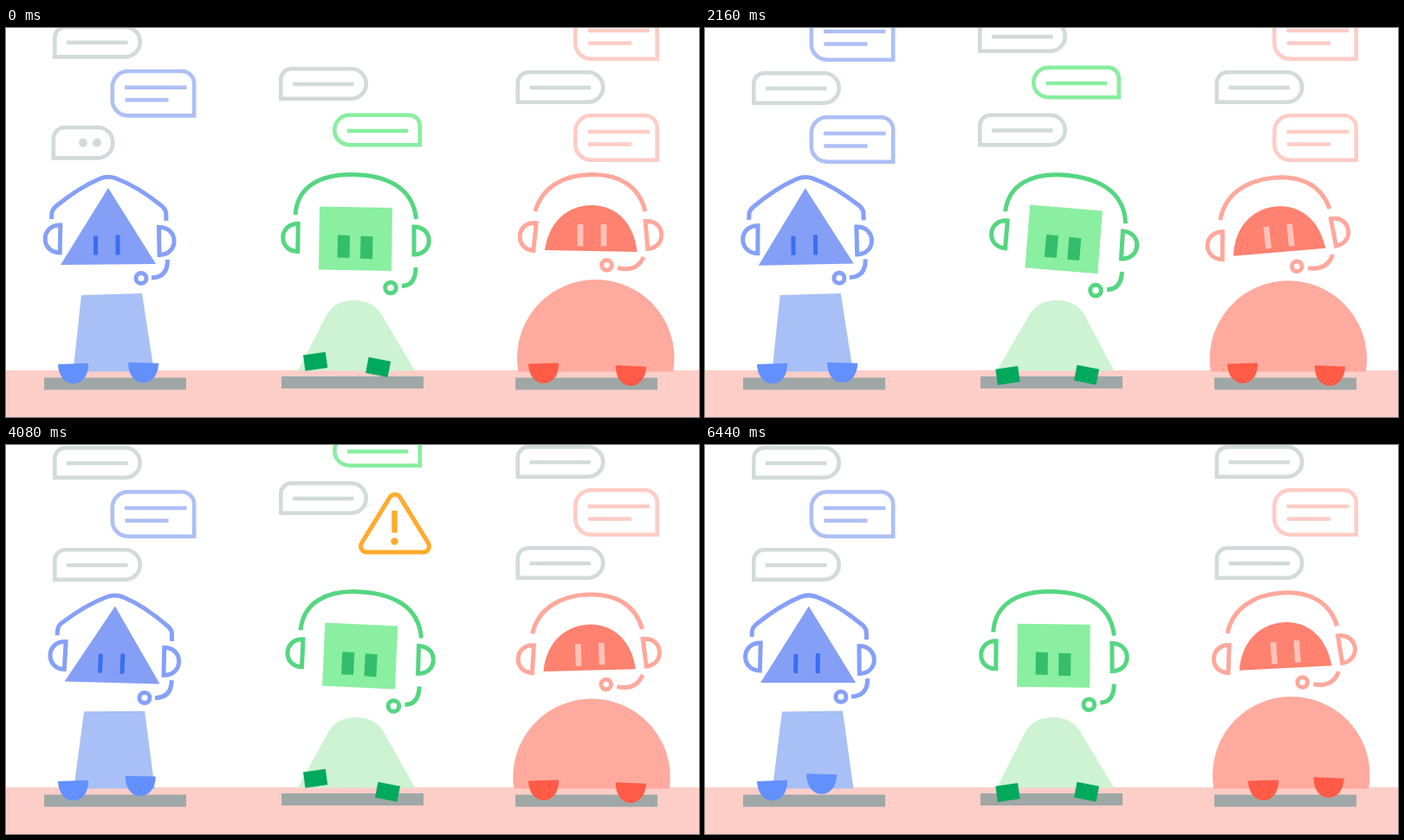
These frames come from a looping animation (800 by 450 pixels, 6.52 s). An HTML page with a canvas:

```html
<!DOCTYPE html>
<html lang="en">
<head>
<meta charset="utf-8">
<title>Support desk</title>
<style>
html, body { margin: 0; width: 100%; height: 100%; overflow: hidden; background: #fff; }
canvas { display: block; width: 800px; height: 450px; }
</style>
</head>
<body>
<canvas id="stage" width="800" height="450"></canvas>
<script>
const LOOP = 6520, STEP = 40;
const CYCLE = 2640, POP = 400, LAG = 20, TYPING = 640;
const GRAY = '#d1dbda', MINT = '#88ee9f', AMBER = '#ffab2e';
const ctx = document.getElementById('stage').getContext('2d');

// ---- timing ----
const clamp = p => Math.min(1, Math.max(0, p));
const smooth = p => p * p * (3 - 2 * p);
function back(p, s = 1.70158) {
  const q = clamp(p) - 1;
  return 1 + (s + 1) * q ** 3 + s * q * q;
}
const pop = (t, start, s) => back((t - start) / POP, s);

// Eased values between key poses [time, value, ...].
function pose(keys, t) {
  const next = keys.findIndex(k => k[0] > t);
  if (next < 0) return keys[keys.length - 1].slice(1);
  const a = keys[next - 1], b = keys[next];
  const p = smooth((t - a[0]) / (b[0] - a[0]));
  return a.slice(1).map((v, i) => v + (b[i + 1] - v) * p);
}

// ---- drawing ----
function fill(path, color) {
  ctx.fillStyle = color;
  ctx.fill(new Path2D(path));
}
function stroke(path, color, width = 5) {
  ctx.strokeStyle = color;
  ctx.lineWidth = width;
  ctx.stroke(new Path2D(path));
}
function ring(x, y, r, color, width = 5) {
  ctx.beginPath();
  ctx.arc(x, y, r, 0, 7);
  ctx.strokeStyle = color;
  ctx.lineWidth = width;
  ctx.stroke();
}
function disc(x, y, r, color) {
  ctx.beginPath();
  ctx.arc(x, y, r, 0, 7);
  ctx.fillStyle = color;
  ctx.fill();
}
function placed(x, y, deg, scale, draw) {
  ctx.save();
  ctx.translate(x, y);
  ctx.rotate(deg * Math.PI / 180);
  ctx.scale(scale, scale);
  draw();
  ctx.restore();
}
function around(x, y, dx, dy, deg, draw) {
  placed(x + dx, y + dy, deg, 1, () => {
    ctx.translate(-x, -y);
    draw();
  });
}
function ear(x, y, side, tilt, color) {
  placed(x, y, tilt, 1, () =>
    stroke(`M0 -16 V16 C${23 * side} 16 ${23 * side} -16 0 -16 Z`, color));
}

// ---- chat ----
function box(w, h, radii, color) {
  ctx.beginPath();
  ctx.roundRect(2.3, 2.3, w - 4.6, h - 4.6, radii);
  ctx.strokeStyle = color;
  ctx.lineWidth = 4.6;
  ctx.stroke();
}
const DOTS = ['1', '12', '2', '0', '01'];
function query(x, y, age = Infinity) {
  if (age < 0) return;
  placed(x, y, 0, 1, () => {
    if (age < TYPING) {
      ctx.translate(-1.5, -2);
      box(73, 40, [13, 17, 17, 0], GRAY);
      for (const i of DOTS[Math.floor(age / 150) % DOTS.length]) disc(20.5 + 16 * i, 20, 5, GRAY);
      return;
    }
    const w = 73 + 30 * back((age - TYPING) / 200);
    box(w, 39, [12, 17, 17, 0], GRAY);
    stroke(`M16 20 H${w - 16.5}`, GRAY, 4.6);
  });
}
function reply(right, y, age, color) {
  if (age < 0) return;
  placed(right, y + 56, 0, pop(age, 0), () => {
    ctx.translate(-99, -56);
    box(99, 56, [18, 14, 0, 18], color);
    stroke('M16.5 21 H88 M17 35.5 H67', color, 4.6);
  });
}

// A query and its reply arrive once per cycle and push the column up.
function column({ left, right, color, base, pitch, gap, ask, answer }, t) {
  const asked = k => ask + (k - 1) * CYCLE, answered = k => answer + (k - 1) * CYCLE;
  let scroll = gap + 18 - base;
  for (let k = 1; k < 4; k++) {
    scroll += (pitch - gap - 18) * pop(t, asked(k)) + (gap + 18) * pop(t, answered(k) + LAG);
  }
  for (let k = -1; k < 4; k++) {
    const y = k * pitch - scroll;
    query(left, y, t - asked(k));
    reply(right, y + gap, t - answered(k), color);
  }
}
const chats = [
  { left: 54, right: 219.5, color: '#aebff6', base: 119, pitch: 118, gap: 51, ask: -200, answer: 1472 },
  { left: 588.5, right: 754, color: '#ffccc5', base: 117, pitch: 117, gap: 50, ask: 28, answer: 1641 }
];

function warning() {
  ctx.beginPath();
  ctx.moveTo(0, 29.5);
  ctx.arcTo(45, 29.5, 0, -43.5, 7);
  ctx.arcTo(0, -43.5, -45, 29.5, 7);
  ctx.arcTo(-45, 29.5, 0, 29.5, 7);
  ctx.closePath();
  ctx.strokeStyle = AMBER;
  ctx.lineWidth = 5;
  ctx.stroke();
  stroke('M-.5 -18.5 V7', AMBER, 6.5);
  disc(-.5, 17, 4.2, AMBER);
}
function solved() {
  ring(0, 0, 66.5, MINT, 5.5);
  ring(-2, 0, 12.5, MINT, 5.5);
  stroke('M-26.5 49 C-26.5 17 23 17 23 49 M-15.5 -40.5 L-5 -29.5 L19.5 -54', MINT, 5.5);
}
function greenChat(t) {
  const followUp = 1456, alarm = 2520, fixed = 4408, gone = 5840;
  const scroll = 55 * pop(t, followUp + LAG) + 56.5 * pop(t, alarm) + 170 * pop(t, fixed - 100);
  query(315, 45 - scroll);
  placed(377, 98.5 - scroll, 0, 1, () => {
    box(103, 39, [17, 12, 0, 17], MINT);
    stroke('M17 20.5 H87', MINT, 4.6);
  });
  placed(315, 192.5 - scroll, 0, pop(t, followUp), () => query(0, -39));
  placed(449, 206 - scroll, 0, pop(t, alarm), warning);
  const size = t < gone ? pop(t, fixed, 1.95) : back((gone + 200 - t) / 200);
  placed(395.5, 81, 0, Math.max(0, size), solved);
}

// ---- agents ----
// Blue: lean, dip. Green: lean. Red: body shift, head shift, turn.
const blueKeys = [
  [0, 0, 0], [240, 0, 0], [960, 1, 2], [1640, .4, -1.5], [2060, -.15, 0], [2720, .9, 2],
  [3520, 1.02, 4], [4400, 0, .5], [4880, 0, .5], [5360, 1.15, .5], [6440, .07, 1.5]
];
const greenKeys = [[0, 0], [1000, .45], [1640, .26], [2720, 1], [3520, .46], [4640, .13], [5360, .27], [6440, -.06]];
const redKeys = [
  [0, 0, 0, 0], [1640, -10, -16.5, -8.5], [2720, -4.5, -7, -3], [3520, -4, -5, -2.4],
  [4640, -5.5, 2, -2.5], [5360, -5.5, 0, -2.5], [5840, -2, 0, -3], [6440, -4, -5, -4]
];

function blueAgent(t) {
  const [lean, dip] = pose(blueKeys, t), s = 5 * lean + dip, c = '#86a0f9';
  fill(`M${87 + s} ${309 - s / 4} L${157 + s} ${307 + s / 4} L${171 + s / 4} 397.5 L${77.5 + s / 4} 397.5 Z`, '#a8c0f5');
  around(118, 273.5, 15 * lean, dip, 7 * lean, () => {
    fill('M118 185 L173 273 L63 274 Z', '#859ff6');
    fill('M101 240.5 H106 V262.5 H101 Z M126.5 239.5 H131.5 V262.5 H126.5 Z', '#3a6df0');
    stroke('M52.5 221 L52.8 215 Q53 210 58 206 C75 192 95 180 108 174.5 Q117.5 170.5 127 174 C146 181 164 193 180 206 Q184.5 210 184.7 214 L185 223', c);
    ear(62.5, 244, -1, 1, c);
    ear(176.8, 246.5, 1, -1, c);
    ring(156, 289.5, 6, c);
    stroke('M186.5 268 Q187 288.5 168 289', c);
  });
}
function greenAgent(t) {
  const [lean] = pose(greenKeys, t), s = 7 * lean - .5, c = '#55d681';
  fill(`M337 396.5 L${370 + s} 333 Q${380 + s} 315 ${402 + s} 315 Q${425 + s} 315 ${435 + s} 333 L472 396.5 Z`, '#cdf3d2');
  around(403.5, 244, 17.5 * lean, lean, 6 * lean, () => {
    fill('M362 206.5 L446 208 L445 281 L361 279.5 Z', '#8aefa0');
    fill('M383 239.5 L397 240 L396.5 266 L382.5 265.5 Z M409.5 240.8 L423.5 241.3 L423 267.3 L409 266.8 Z', '#34be6c');
    stroke('M334 216 C336 184 362 169.5 398 169.5 C438 169.5 470 184 473.5 221', c);
    ear(337, 242.5, -1, 1, c);
    ear(471, 246, 1, 0, c);
    ring(444, 300.5, 6.3, c);
    stroke('M473 277 Q473 298 457 298.5', c);
  });
}
function redAgent(t) {
  const [shift, dx, turn] = pose(redKeys, t), c = '#ffa89c';
  const breath = 1.4 * Math.sin((t - 2100) / LOOP * 2 * Math.PI);
  const x = 590 + shift, y = 292 + breath;
  fill(`M${x + 1} 397.5 A90.75 91 0 1 1 ${x + 180.5} 397.5 Z`.replace(/^/, ''), 'rgba(0,0,0,0)');
  ctx.save();
  ctx.beginPath();
  ctx.rect(x - 5, 0, 192, 397.5);
  ctx.clip();
  disc(x + 90.75, y + 91, 90.75, '#ffaa9e');
  ctx.restore();
  around(675, 259, dx, .3 + breath, turn, () => {
    fill('M622 258 C626 226 648 206 676 206 C704 206 725 226 728.5 260 Z', '#ff816f');
    const h = 12.7 - 9 * Math.max(0, 1 - Math.abs(t - 1640) / 120);
    for (const eye of [663, 690]) fill(`M${eye - 3.4} ${240.7 - h} h6.8 v${2 * h} h-6.8 Z`, '#ffc2b9');
    ctx.translate(0, -.35 * turn);
    stroke('M611 213 C619 184 645 170.5 677 170.5 C708 170.5 731 184 738 213', c);
    ear(610.5, 242.5, -1, 6, c);
    ear(739.5, 240.5, 1, -5, c);
    ring(693.5, 275.3, 5.8, c);
    stroke('M736 266 Q728 284 706 278.5', c);
  });
}

// ---- hands ----
// Each hand hops between home and reach in bursts of [start, beats].
const CUP = 'M-17.5 0 H17.5 C17.5 14 10 23 0 23 C-10 23 -17.5 14 -17.5 0 Z';
const BLOCK = 'M-13 -9.2 H13 V9.2 H-13 Z';
const BLUE = '#6390ff', GREEN = '#00a95b', RED = '#ff5b47';
const hands = [
  { shape: CUP, color: BLUE, x: 77.5, y: 388.3, tilt: -2, reach: 1, lift: 14, beat: 347, bursts: [[600, 2], [2653, 4], [5746, 2]] },
  { shape: CUP, color: BLUE, x: 158.7, y: 387.2, tilt: 1.5, reach: -35, lift: 7, beat: 200, bursts: [[520, 4], [2520, 8], [5916, 4]] },
  { shape: BLOCK, color: GREEN, x: 349.5, y: 402, tilt: -8, reach: 27, lift: 18, beat: 280, bursts: [[-100, 4], [2664, 2], [3620, 2], [4516, 4]] },
  { shape: BLOCK, color: GREEN, x: 440.5, y: 401.2, tilt: 11, reach: -12, lift: 15, beat: 280, bursts: [[-224, 4], [1374, 2], [2468, 2], [4458, 2], [5700, 2]] },
  { shape: CUP, color: RED, x: 620.5, y: 388, tilt: -1.5, reach: 24, lift: 14, beat: 205, bursts: [[440, 4], [2659, 6], [5825, 4]] },
  { shape: CUP, color: RED, x: 721.5, y: 391, tilt: 2.5, reach: -22, lift: 13, beat: 193, bursts: [[480, 4], [2585, 6], [6025, 4]] }
];
function drawHand({ shape, color, x, y, tilt, reach, lift, beat, bursts }, t) {
  const burst = bursts.find(([start, beats]) => t >= start && t < start + beats * beat);
  const turn = burst ? (t - burst[0]) / beat * Math.PI : 0;
  const dx = reach * (1 - Math.cos(turn)) / 2, dy = lift * Math.abs(Math.sin(turn));
  placed(x + dx, y - dy, tilt, 1, () => fill(shape, color));
}

function draw(t) {
  ctx.fillStyle = '#fff';
  ctx.fillRect(0, 0, 800, 450);
  fill('M0 396 H800 V450 H0 Z', '#fdcec8');
  chats.forEach(chat => column(chat, t));
  greenChat(t);
  blueAgent(t);
  greenAgent(t);
  redAgent(t);
  fill('M44 404.5 h164 v14 h-164 Z M318 403 h164 v14 h-164 Z M588 404.5 h164 v14 h-164 Z', '#9fa8a7');
  hands.forEach(hand => drawHand(hand, t));
}

const begin = performance.now();
function tick() {
  const t = (performance.now() - begin) % LOOP;
  draw(Math.min(LOOP - 2 * STEP, Math.floor(t / STEP) * STEP));
  requestAnimationFrame(tick);
}
tick();
</script>
</body>
</html>
```
